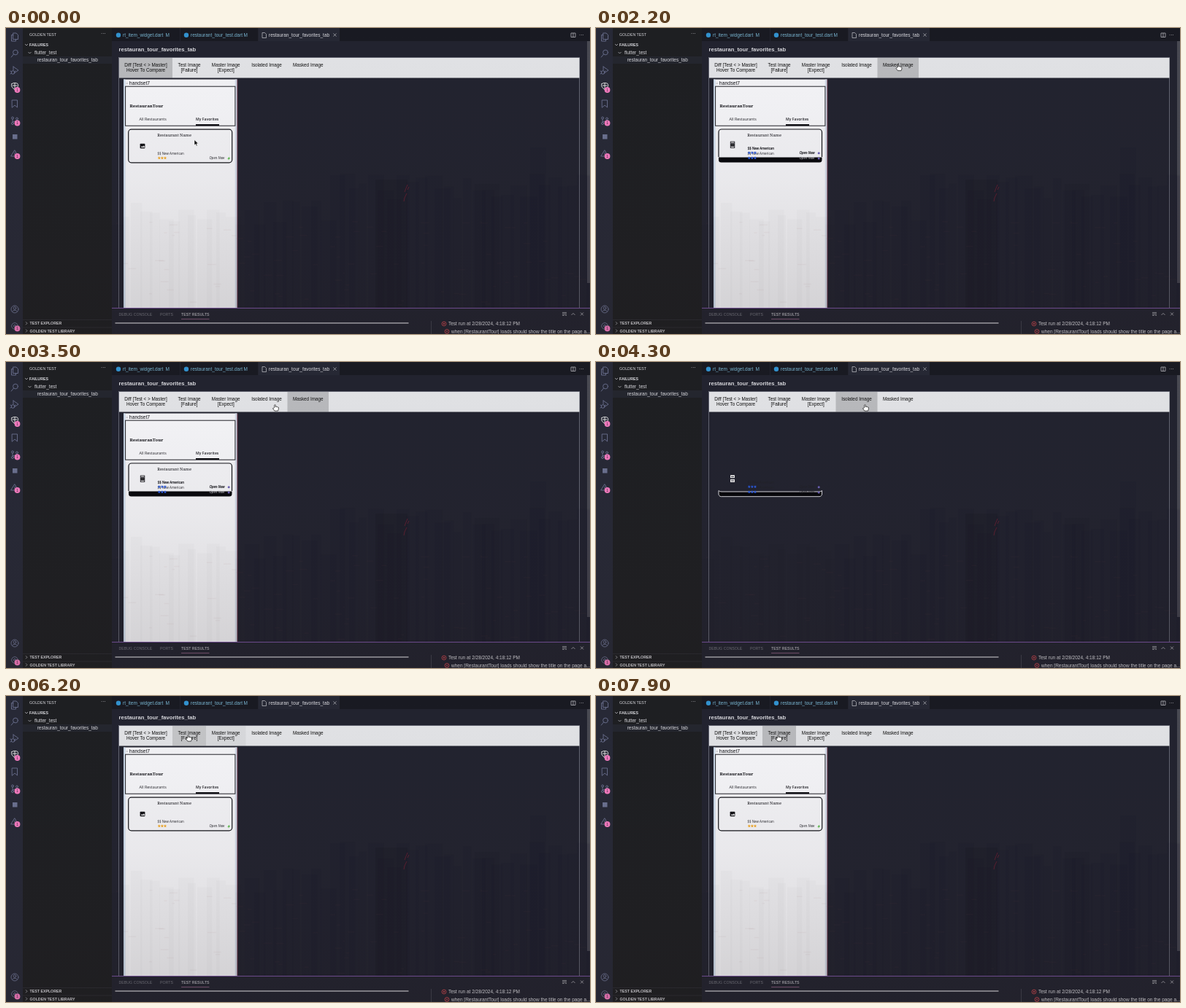
An HTML page for the animation above (8 s loop, 800x420 px).

```html
<!DOCTYPE html>
<html lang="en">
<head>
<meta charset="utf-8">
<title>Golden test viewer</title>
<style>
html, body { margin: 0; width: 100%; height: 100%; overflow: hidden; background: #22232f; }
svg { display: block; width: 800px; height: 420px; }
text { font: 6.5px "Liberation Sans", Arial, sans-serif; fill: #d9d9de; white-space: pre; }
.caps { font-size: 5.25px; }
.bold { font-weight: 700; }
.dim { fill: #75767f; }
.mod { fill: #78b4cf; }
.btn { font-size: 6.35px; fill: #111; text-anchor: middle; }
.serif { font-family: "Noto Serif", serif; fill: #15151a; }
.sans, .cuisine, .open { font-family: "Open Sans", sans-serif; fill: #222227; }
.cuisine { font-size: 4.45px; font-weight: 500; }
.open { font-size: 4.55px; font-style: italic; }
.light text { fill: #d5d5da; }
.line { fill: none; stroke: #6b7190; stroke-width: .9; stroke-linecap: round; stroke-linejoin: round; }
.on { stroke: #eee; }
.chev { fill: none; stroke: #c5c5cb; stroke-width: .7; }
</style>
</head>
<body>
<svg viewBox="0 0 800 420">
  <defs>
    <linearGradient id="haze" x1="0" y1="0" x2="0" y2="1">
      <stop offset="0" stop-color="#20222f" stop-opacity="0"/>
      <stop offset=".5" stop-color="#30242a" stop-opacity=".05"/>
      <stop offset="1" stop-color="#241a1a" stop-opacity=".15"/>
    </linearGradient>
    <g id="stars">
      <path id="star" d="M2.2-2.2l.6 1.4 1.5.1-1.1 1 .4 1.5-1.4-.8-1.3.8.3-1.5-1.1-1 1.5-.1z"/>
      <use href="#star" x="4.1"/>
      <use href="#star" x="8.2"/>
    </g>
    <g id="details">
      <text class="cuisine" x="207.5" y="174">$$ New American</text>
      <text class="open" x="278.5" y="180.2">Open Now</text>
    </g>
    <g id="status">
      <use href="#stars" x="207.6" y="178.4" fill="#f0a92b"/>
      <path d="M306 176.8l-2.8 2.8h1.7l-.6 1.9 3-2.9h-1.6z" fill="#4db53c"/>
    </g>
    <g id="blueStatus" fill="#2b5be0">
      <use href="#stars" x="207.6" y="178.4"/>
      <circle cx="305.2" cy="179" r="1.5" fill="#6d62b8"/>
    </g>
    <g id="picture">
      <rect x="183.6" y="158.7" width="6.8" height="6.6" rx=".8" fill="#101014"/>
      <path d="M184.7 164l1.5-2 1.2 1.2 1.3-1.9 1.7 2.7z" fill="#f2f2f5"/>
    </g>
    <g id="badge">
      <circle r="3.9" fill="#f57bc0"/>
      <text x="-1.2" y="1.6" style="font-size:4.6px;fill:#302033">1</text>
    </g>
  </defs>

  <!-- editor chrome -->
  <rect width="800" height="420" fill="#22232f"/>
  <rect width="23" height="420" fill="#272936"/>
  <rect x="23" width="122" height="420" fill="#1e1f22"/>
  <rect x="23" y="39" width="122" height="10" fill="#24262e"/>
  <path d="M23 400.5h122M23 411h122" stroke="#33343b" stroke-width=".6"/>
  <rect x="145" width="655" height="18" fill="#191a22"/>
  <rect x="346" width="111" height="18" fill="#262834"/>
  <path d="M238.5 0v18M345.5 0v18" stroke="#23242e"/>

  <g class="line">
    <path d="M10 7h4l2.5 2.5v6h-6.5zM10 9.5H7.5v8.5h6v-2.5"/>
    <circle cx="13" cy="33.5" r="3.4"/><path d="M10.5 36l-3.3 4"/>
    <path d="M10 53l7 5-6 4M10 53v5"/><circle cx="9.5" cy="61" r="2.3"/><path d="M6 59l1.5 1M6 63l1.5-1M13 59l-1.500 1"/>
    <path class="on" d="M8 76.5c2-1.5 6-1.500 8 0 2 3-1 6-4 8-3-2-6-5-4-8zM12 76v8M9 79h6"/>
    <path d="M8.500 99h7v10l-3.500-3-3.500 3z"/>
    <circle cx="9" cy="123.500" r="1.500"/><circle cx="15" cy="124.500" r="1.500"/><circle cx="9" cy="131" r="1.500"/><path d="M9 125v4.500M15 126c0 2-3 2-6 3"/>
    <path d="M12 168l5 8H7zM12 171v3"/>
    <circle cx="12" cy="386" r="5"/><circle cx="12" cy="384.500" r="1.800"/><path d="M8.500 389.500c1-3 6-3 7 0"/>
    <circle cx="12" cy="409" r="4.300"/><circle cx="12" cy="409" r="1.500"/>
  </g>
  <rect x="9" y="146" width="6.500" height="6.500" fill="#6b7190"/>
  <use href="#badge" x="15.500" y="85"/>
  <use href="#badge" x="15.500" y="130.500"/>
  <use href="#badge" x="15.500" y="176"/>
  <use href="#badge" x="15.500" y="412.500"/>

  <text class="caps" x="32" y="11.400">GOLDEN TEST</text>
  <text x="130" y="10">···</text>
  <text class="caps bold" x="32" y="25">FAILURES</text>
  <text x="39" y="36.200">flutter_test</text>
  <text x="42.700" y="46.400">restauran_tour_favorites_tab</text>
  <text class="caps bold" x="32.500" y="407.200">TEST EXPLORER</text>
  <text class="caps bold" x="32.500" y="417.700">GOLDEN TEST LIBRARY</text>
  <path class="chev" d="M26 22l2 2 2-2M30.500 33l2 2 2-2M27 403.300l2 2-2 2M27 413.600l2 2-2 2"/>

  <circle cx="154" cy="9.700" r="3.200" fill="#3291ce"/>
  <text class="mod" x="160" y="12">rt_item_widget.dart</text>
  <text class="mod" x="218.500" y="12">M</text>
  <circle cx="247" cy="9.700" r="3.200" fill="#3291ce"/>
  <text class="mod" x="253" y="12">restaurant_tour_test.dart</text>
  <text class="mod" x="325.500" y="12">M</text>
  <path class="chev" d="M351 6.500h3.500l2 2v5h-5.500zM448.500 7.500l4 4m0-4l-4 4M774 7h6v5.500h-6zM777 7v5.500"/>
  <text x="360" y="12">restauran_tour_favorites_tab</text>
  <text x="785" y="11.500">···</text>

  <text class="bold" x="154.500" y="32" style="font-size:7.650px">restauran_tour_favorites_tab</text>
  <rect x="796" y="18" width="4" height="332" fill="#484952"/>

  <!-- comparison page -->
  <rect x="154.500" y="40.500" width="631" height="350" fill="none" stroke="#747783" stroke-width=".8"/>
  <rect x="155" y="41" width="630.500" height="27.500" fill="#e2e3e6"/>
  <g id="buttons"></g>

  <g id="phone">
    <rect x="161" y="70.500" width="155.500" height="314" fill="#f3f3f6"/>
    <rect x="161" y="70.500" width="2.500" height="314" fill="#cbd9e9"/>
    <rect x="313.800" y="70.500" width="2.700" height="314" fill="#d0d8e6"/>
    <path d="M317 71v313" stroke="#7c3045" stroke-width=".7"/>
    <path d="M164.500 76h2.500" stroke="#9a9aa5" stroke-width=".7"/>
    <text x="168.800" y="78.400" style="font-size:6.900px;fill:#17171b">handset7</text>
    <rect x="163.600" y="80.200" width="150.300" height="54" fill="#f5f5f8" stroke="#232328"/>
    <text class="serif bold" x="169.500" y="109" style="font-size:6px">RestauranTour</text>
    <text class="sans" x="182.500" y="127" style="font-size:5.350px">All Restaurants</text>
    <text class="sans" x="260" y="127" style="font-size:5.100px;font-weight:600">My Favorites</text>
    <rect x="260" y="132" width="32" height="2" fill="#111116"/>
    <text class="serif" x="207.300" y="149.200" style="font-size:5.650px;font-weight:500">Restaurant Name</text>
  </g>
  <g id="test">
    <rect x="167.700" y="139.200" width="142" height="45.600" rx="4" fill="none" stroke="#15151a" stroke-width="1.200"/>
    <use href="#picture"/>
    <use href="#details"/><use href="#status"/>
  </g>
  <g id="master">
    <rect x="167.700" y="139.200" width="142" height="38.500" rx="4" fill="none" stroke="#15151a" stroke-width="1.200"/>
    <use href="#picture" y="-3.600"/>
    <use href="#details" y="-7.200"/><use href="#status" y="-7.200"/>
  </g>
  <g id="masked">
    <path d="M168 177v-34a4 4 0 0 1 4-4h133.500a4 4 0 0 1 4 4v34" fill="none" stroke="#15151a" stroke-width="1.200"/>
    <path d="M168 177.500h141.500v3.500a3.500 3.500 0 0 1-3.500 3.500H171.500a3.500 3.500 0 0 1-3.500-3.500z" fill="#08080c"/>
    <rect x="183.800" y="155.500" width="6.500" height="9.500" rx=".6" fill="#45454a"/>
    <path d="M185 157h4M185 163.500h4" stroke="#eee" stroke-width="1"/>
    <path d="M184 160.500h6" stroke="#111" stroke-width="1"/>
    <use href="#details" y="-7.200"/>
    <use href="#details" x=".4" y="-7"/>
    <text class="cuisine" x="207.500" y="174">$$ New American</text>
    <text class="open" x="278.500" y="180.200" style="fill:#d5d5da">Open Now</text>
    <use href="#blueStatus"/><use href="#blueStatus" y="-7.200"/>
  </g>
  <g id="isolated" class="light">
    <path d="M168 176.500q1 1.500 4 1.500h133.500q3 0 4-1.500v4.500a3.500 3.500 0 0 1-3.500 3.700H171.500a3.500 3.500 0 0 1-3.500-3.700z" fill="#06060a" stroke="#ededf2" stroke-width=".9"/>
    <path d="M184 155.300h6v4h-6zM184 161h6v4h-6z" fill="#eee"/>
    <path d="M185 157.500h4M185 163h4" stroke="#22232f" stroke-width=".9"/>
    <use href="#details"/><use href="#details" y="-7.200"/>
    <use href="#blueStatus"/><use href="#blueStatus" y="-7.200"/>
  </g>

  <!-- lower panel -->
  <rect x="145" y="384" width="655" height="36" fill="#22232f"/>
  <path d="M145 384.500h655" stroke="#76519b"/>
  <g class="caps">
    <text class="caps dim" x="154.500" y="395">DEBUG CONSOLE</text>
    <text class="caps dim" x="211" y="395">PORTS</text>
    <text class="caps" x="240" y="395">TEST RESULTS</text>
  </g>
  <path d="M240 399.500h38.500" stroke="#a36a92" stroke-width=".7"/>
  <rect x="149.500" y="404" width="402" height="2" fill="#8b8b93"/>
  <path d="M582.500 402v18" stroke="#4b4c57" stroke-width=".7"/>
  <path class="chev" d="M762 390.500h6M762 392.500h6M762 394.500h3M766 394.500h2M774.500 394l2.500-2.500 2.500 2.500M787 390.500l4 4m0-4l-4 4"/>
  <g fill="none" stroke="#d84a51" stroke-width=".8">
    <circle cx="600" cy="406" r="2.900"/><path d="M599 405l2 2m0-2l-2 2"/>
    <circle cx="604" cy="416.500" r="2.900"/><path d="M603 415.500l2 2m0-2l-2 2"/>
  </g>
  <text x="606" y="408.400">Test run at 2/28/2024, 4:18:12 PM</text>
  <text x="610" y="418.800">when [RestaurantTour] loads should show the title on the page a...</text>

  <!-- faint city over everything -->
  <g id="city"></g>
  <path d="M550 215l-4 10M549 227l-3 6M546 233l-1 5M552 218l-2 4" stroke="#a52138" stroke-width=".7" opacity=".65"/>
  <rect width="800" height="420" fill="url(#haze)"/>

  <g id="cursor">
    <path id="arrow" d="M0 0v7.300l1.700-1.500 1.200 2.700 1.300-.6-1.200-2.600h2.400z" fill="#000" stroke="#fff" stroke-width=".6"/>
    <path id="hand" d="M-.8 4V.6q.8-1.200 1.600 0V3q.9-.6 1.500.2.900-.5 1.400.3 1-.3 1.200.6v2L4 8.600H-.6L-3 5.400q.2-1.200 1.300-.6z" fill="#fff" stroke="#111" stroke-width=".7"/>
  </g>
</svg>
<script>
const $ = id => document.getElementById(id);
const clamp = v => Math.min(1, Math.max(0, v));
const LOOP = 8000, STEP = 100, FADE = 400;

const buttons = [
  [155, 228, 'Diff [Test < > Master]', 'Hover To Compare'],
  [228, 274, 'Test Image', '[Failure]'],
  [274, 328.5, 'Master Image', '[Expect]'],
  [328.5, 385.5, 'Isolated Image', ''],
  [385.5, 442, 'Masked Image', '']
];
const views = ['test', 'test', 'master', 'isolated', 'masked'];
const clicks = [[-FADE, 0], [1800, 4], [3800, 3], [5000, 2], [5900, 1]]; // time, button
const moves = [ // start, end, x, y
  [0, 0, 258, 153.5], [400, 1300, 414, 50], [2900, 3300, 368.5, 58.5],
  [4500, 4900, 302.5, 45.5], [5600, 5900, 249.5, 53.5]
];

const esc = s => s.replace('<', '&lt;').replace('>', '&gt;');
$('buttons').innerHTML = buttons.map(([a, b, top, low]) => {
  const mid = (a + b) / 2;
  return `<rect x="${a}" y="41" width="${b - a}" height="27.5" opacity="0"/>
    <text class="btn" x="${mid}" y="53">${esc(top)}</text>
    <text class="btn" x="${mid}" y="60.4">${low}</text>`;
}).join('');
const shades = $('buttons').querySelectorAll('rect');

let seed = 11;
const rand = () => (seed = seed * 16807 % 2147483647) / 2147483647;
const block = (x, y, w, a) =>
  `<rect x="${x}" y="${y}" width="${w}" height="${384 - y}" fill="#0b0b14" opacity="${a}"/>`;
let city = block(506, 208, 44, .12) + block(718, 164, 22, .05) + block(642, 214, 34, .07);
for (let x = 145; x < 800; x += 13) {
  const rise = x > 440 ? 35 : 0;
  city += block(x, 270 - rise - rand() * 35, 10 + rand() * 14, x < 317 ? .015 : .05);
}
for (let i = 0; i < 90; i++) {
  city += `<rect x="${150 + rand() * 640}" y="${265 + rand() * 115}" width="${3 + rand() * 9}"
    height="1.5" fill="#8a5b4e" opacity=".05"/>`;
}
$('city').innerHTML = city;

function draw(t) {
  const past = clicks.filter(c => c[0] <= t);
  const [since, now] = past.at(-1);
  const before = past.length > 1 ? past.at(-2)[1] : -1;
  const fade = clamp((t - since) / FADE);
  shades.forEach((r, i) =>
    r.setAttribute('opacity', .18 * (i === now ? fade : i === before ? 1 - fade : 0)));

  for (const id of new Set(views)) $(id).style.display = id === views[now] ? '' : 'none';
  $('phone').style.display = views[now] === 'isolated' ? 'none' : '';

  let [, , x, y] = moves[0];
  for (const [a, b, tx, ty] of moves.slice(1)) {
    const p = clamp((t - a) / (b - a)), e = p * p * (3 - 2 * p);
    x += (tx - x) * e;
    y += (ty - y) * e;
  }
  $('cursor').setAttribute('transform', `translate(${x} ${y})`);
  $('hand').style.display = y < 68 ? '' : 'none';
  $('arrow').style.display = y < 68 ? 'none' : '';
}

const start = performance.now();
function tick() {
  const t = (performance.now() - start) % LOOP;
  draw(Math.floor(t / STEP) * STEP);
  requestAnimationFrame(tick);
}
tick();
</script>
</body>
</html>
```
